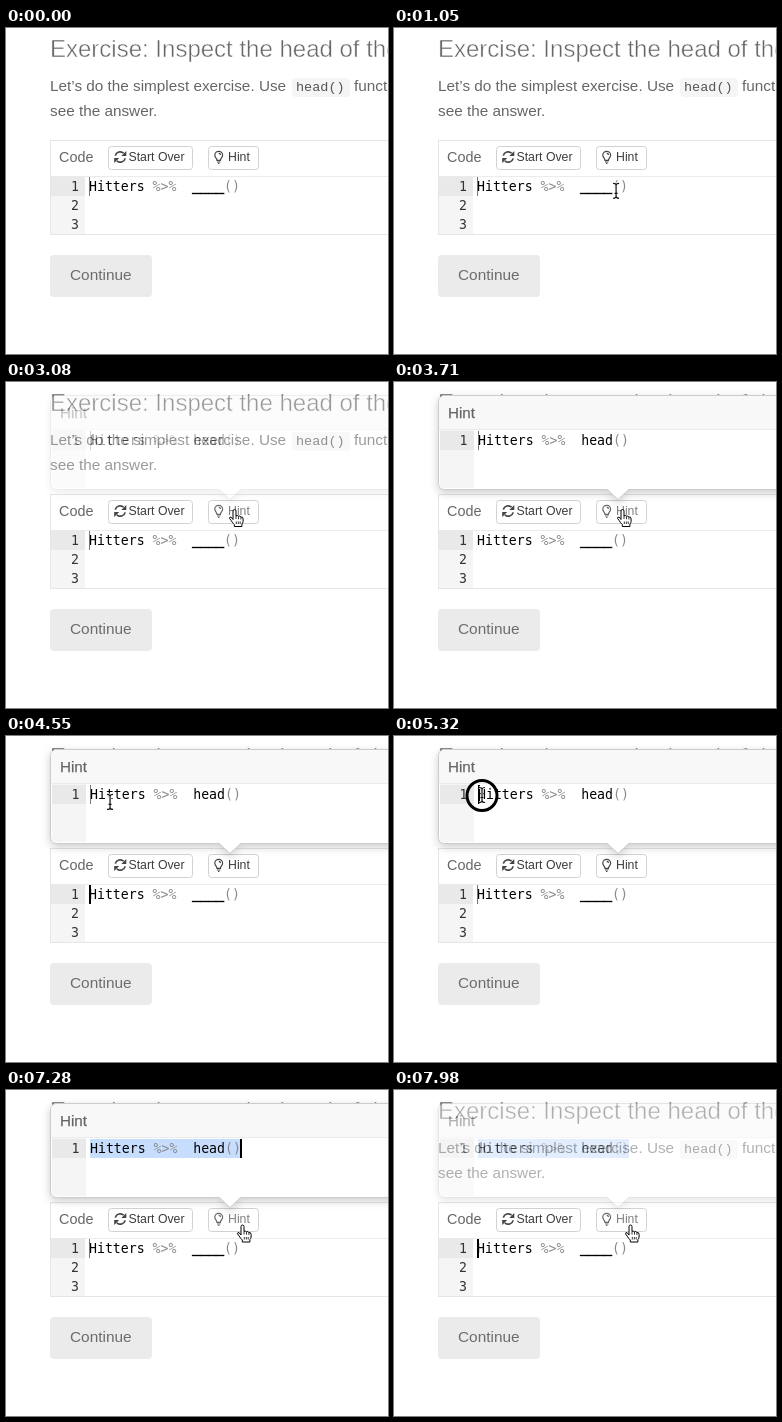
Recreate the animation shown at these times as an HTML page. Size 382 by 326 pixels, loop 8 s.

```html
<!DOCTYPE html>
<html lang="en">
<head>
<meta charset="utf-8">
<title>Exercise with a hint</title>
<style>
html, body { margin: 0; width: 100%; height: 100%; overflow: hidden; background: #fff; }
svg { display: block; width: 382px; height: 326px; }
text { font-family: "Liberation Sans", Arial, sans-serif; white-space: pre; }
.title { font-size: 24px; fill: #666; stroke: #fff; stroke-width: .5px; }
.body { font-size: 15.3px; fill: #666; }
.inline { font: 13.5px "Liberation Mono", "Courier New", monospace; fill: #555; }
.code { font: 13.2px "DejaVu Sans Mono", monospace; fill: #000; }
.num { fill: #333; text-anchor: end; }
.op { fill: #8a8a8a; }
.blank { stroke: #000; stroke-width: .8px; }
.btn rect { fill: #fff; stroke: #d2d2d2; }
.btn text { font-size: 12.3px; fill: #3c3c3c; }
.btn .icon { fill: none; stroke: #444; }
.btn.hover text { fill: #808080; }
.btn.hover .icon { stroke: #666; }
.pop { filter: drop-shadow(0 3px 4px rgba(0, 0, 0, .2)); }
</style>
</head>
<body>
<svg viewBox="0 0 382 326">
  <text class="title" x="44" y="29">Exercise: Inspect the head of the</text>
  <text class="body" x="44" y="63">Let’s do the simplest exercise. Use</text>
  <rect x="286" y="50" width="58" height="19" rx="4" fill="#f5f5f5"/>
  <text class="inline" x="290" y="63">head()</text>
  <text class="body" x="348" y="63">function to</text>
  <text class="body" x="44" y="88">see the answer.</text>

  <rect x="44.5" y="112.5" width="360" height="94" fill="#fff" stroke="#e6e6e6"/>
  <path d="M45 148.5H382" stroke="#ebebeb"/>
  <text x="53" y="134" font-size="14.4" fill="#666">Code</text>
  <g class="btn">
    <rect x="102.5" y="118.5" width="84" height="23" rx="3"/>
    <g class="icon" stroke-width="1.7">
      <path d="M109.3 127.6A5 5 0 0 1 117.6 125.2M119.2 130.4A5 5 0 0 1 110.9 132.8"/>
      <path d="M120.3 123v5h-5zM108.2 135v-5h5z" fill="#444" stroke="none"/>
    </g>
    <text x="122.5" y="133">Start Over</text>
  </g>
  <g class="btn" id="hintBtn">
    <rect x="202.5" y="118.5" width="50" height="23" rx="3"/>
    <path class="icon" stroke-width="1.2" d="M211 132.4C211 130 208.8 129.6 208.8 127.2a3.9 3.9 0 0 1 7.8 0C216.6 129.6 214.4 130 214.4 132.4zM211 134h3.4M212 135.5h1.4M212.7 125.3a1.8 1.8 0 0 1 1.8 1.8"/>
    <text x="222" y="133">Hint</text>
  </g>
  <rect x="45" y="149" width="34" height="57" fill="#f5f5f5"/>
  <rect x="45" y="149" width="34" height="19" fill="#e9e9e9"/>
  <text class="code num" x="73" y="163">1</text>
  <text class="code num" x="73" y="182">2</text>
  <text class="code num" x="73" y="201">3</text>
  <text class="code" x="83" y="163">Hitters <tspan class="op">%&gt;%</tspan>  <tspan class="blank" dy="-1.5">____</tspan><tspan class="op" dy="1.5">()</tspan></text>
  <rect id="mainCaret" y="149" height="19"/>

  <rect x="44" y="227" width="102" height="42" rx="4" fill="#ebebeb"/>
  <text x="64" y="252" font-size="15.4" fill="#6c6c6c">Continue</text>

  <g id="pop" class="pop">
    <path d="M400 13.5H50.5a6 6 0 0 0-6 6V101.5a6 6 0 0 0 6 6H213.5L224 117.5L234.5 107.5H400z" fill="#fff" stroke="#ccc"/>
    <path d="M400 14H50.5a5.5 5.5 0 0 0-5.5 5.5V47H400z" fill="#f8f8f8"/>
    <path d="M45 47.5H382" stroke="#ebebeb"/>
    <text x="54" y="36" font-size="15.2" fill="#666" stroke="#666" stroke-width=".25">Hint</text>
    <rect x="46" y="48" width="34" height="58" fill="#f5f5f5"/>
    <rect x="46" y="49" width="34" height="19" fill="#e9e9e9"/>
    <rect id="sel" x="84" y="49" height="19"/>
    <text class="code num" x="73.5" y="63">1</text>
    <text class="code" x="84" y="63">Hitters <tspan class="op">%&gt;%</tspan>  head<tspan class="op">()</tspan></text>
    <rect id="hintCaret" y="49" height="19"/>
  </g>

  <circle id="ring" fill="none" stroke="#000" stroke-width="3"/>
  <g id="cursor" stroke-linejoin="round">
    <path id="arrow" d="M0 0V14.5L3.4 11.4L5.6 16.5L8 15.5L5.8 10.5H10.5z" fill="#000" stroke="#fff"/>
    <g id="ibeam" fill="none">
      <path d="M-3-7.5Q0-7.5 0-5.5Q0-7.5 3-7.5M0-5.5V5.5M-3 7.5Q0 7.5 0 5.5Q0 7.5 3 7.5M-1.5 2.5H1.5" stroke="#fff" stroke-width="2.6"/>
      <path d="M-3-7.5Q0-7.5 0-5.5Q0-7.5 3-7.5M0-5.5V5.5M-3 7.5Q0 7.5 0 5.5Q0 7.5 3 7.5M-1.5 2.5H1.5" stroke="#111" stroke-width="1.2"/>
    </g>
    <g id="hand" stroke="#000">
      <path fill="#fff" d="M-1.5 9.5V1A1.5 1.5 0 0 1 1.5 1V6Q2.5 4.8 4 6.2Q5.5 5.4 6.4 7Q8.6 6.6 8.6 9V11.5Q8.4 13 7.4 14V16.5H-.2V14.5Q-2 13-3.3 10.6L-5 8.4Q-5 6.6-3.3 7.2z"/>
      <path d="M1.5 6V9M4 6.5V9.2M6.4 7.2V9.5M1.8 11.5V14M3.8 11.5V14M5.7 11.5V14" fill="none" stroke-width=".8"/>
    </g>
  </g>
</svg>
<script>
const LOOP = 8000, STEP = 70;
const el = id => document.getElementById(id);
const clamp = v => Math.min(1, Math.max(0, v));
const smooth = v => v * v * (3 - 2 * v);
const within = (t, a, b) => t >= a && t < b;
const set = (id, attrs) => { for (const k in attrs) el(id).setAttribute(k, attrs[k]); };
const show = (id, on) => set(id, { visibility: on ? "visible" : "hidden" });

// Pointer moves: start, end, from, bend, to
const moves = [
  [630, 1260, [242, 292], [208, 190], [229.5, 128]],
  [2380, 2450, [229.5, 128], [229, 128], [228.5, 128]],
  [3990, 4690, [228.5, 128], [166, 92], [88, 59]],
  [5670, 5740, [88, 59], [87, 59], [86, 59]],
  [6090, 6510, [86, 59], [185, 60.5], [284, 59]],
  [6720, 7280, [284, 59], [238, 160], [236.5, 135.5]]
];

// Press rings: start, end, radius, opacity
const rings = [
  [1680, 1750, 20, .5], [1750, 1820, 18, .8], [1820, 1960, 15.5, 1],
  [2800, 2940, 29.5, .3],
  [4970, 5040, 17, .8], [5040, 5110, 15.5, 1], [5320, 5390, 15, 1],
  [5740, 5810, 16, .8], [5810, 6650, 15, 1],
  [7630, 7840, 30, .3]
];

function pointer(t) {
  const [a, b, p, c, q] = moves.filter(m => t >= m[0]).pop() || moves[0];
  const u = smooth(clamp((t - a) / (b - a))), v = 1 - u;
  return p.map((s, i) => v * v * s + 2 * u * v * c[i] + u * u * q[i]);
}

function popOpacity(t) {
  if (t < 3080) return 0;
  if (t < 7840) return Math.min(1, .35 * (1 + (t - 3080) / STEP));
  return .87 - .19 * (t - 7840) / STEP;
}

function pointerKind(x, y, open) {
  if (within(x, 202, 254) && within(y, 118, 143)) return "hand";
  const inText = x > 80 && (within(y, 149, 206) || open && within(y, 48, 107));
  return inText ? "ibeam" : "arrow";
}

function caret(id, x, mode) {
  show(id, mode > 0);
  set(id, { x, width: mode || 1, fill: mode === 1 ? "#777" : "#000" });
}

// 0 hidden, 1 idle, 2 focused
function mainMode(t) {
  if (t < 3220 || within(t, 5040, 7840)) return 1;
  return within(t, 3710, 4200) || within(t, 4690, 5040) ? 0 : 2;
}
function hintMode(t) {
  if (t < 4970) return 1;
  return within(t, 5600, 5740) || within(t, 6930, 7210) || t >= 7630 ? 0 : 2;
}

function draw(now) {
  const t = Math.floor(now % LOOP / STEP) * STEP;
  const [x, y] = pointer(t);
  const alpha = popOpacity(t);
  const kind = pointerKind(x, y, alpha > 0);

  show("cursor", t >= 700);
  set("cursor", { transform: `translate(${x} ${y})` });
  for (const k of ["arrow", "ibeam", "hand"]) el(k).style.display = k === kind ? "" : "none";
  el("hintBtn").classList.toggle("hover", t >= 700 && kind === "hand");

  const ring = rings.find(r => within(t, r[0], r[1]));
  show("ring", ring);
  if (ring) set("ring", { cx: x, cy: y + (kind === "ibeam" ? .5 : -1), r: ring[2], opacity: ring[3] });

  // Selection trails the pointer by one step and snaps to characters
  const chars = t < 6160 ? 0 : Math.min(19, Math.max(0, Math.round((pointer(t - STEP)[0] - 84) / 7.95)));
  const width = t >= 6650 ? 151 : chars * 7.95;
  set("sel", { width, fill: t < 6510 ? "#b5d5ff" : "#c6ddfd" });
  caret("hintCaret", t < 6370 ? 84 : 83 + width, hintMode(t));
  caret("mainCaret", 83, mainMode(t));

  el("pop").style.display = alpha ? "" : "none";
  el("pop").style.opacity = alpha;
}

function tick() {
  draw(performance.now());
  requestAnimationFrame(tick);
}
tick();
</script>
</body>
</html>
```
